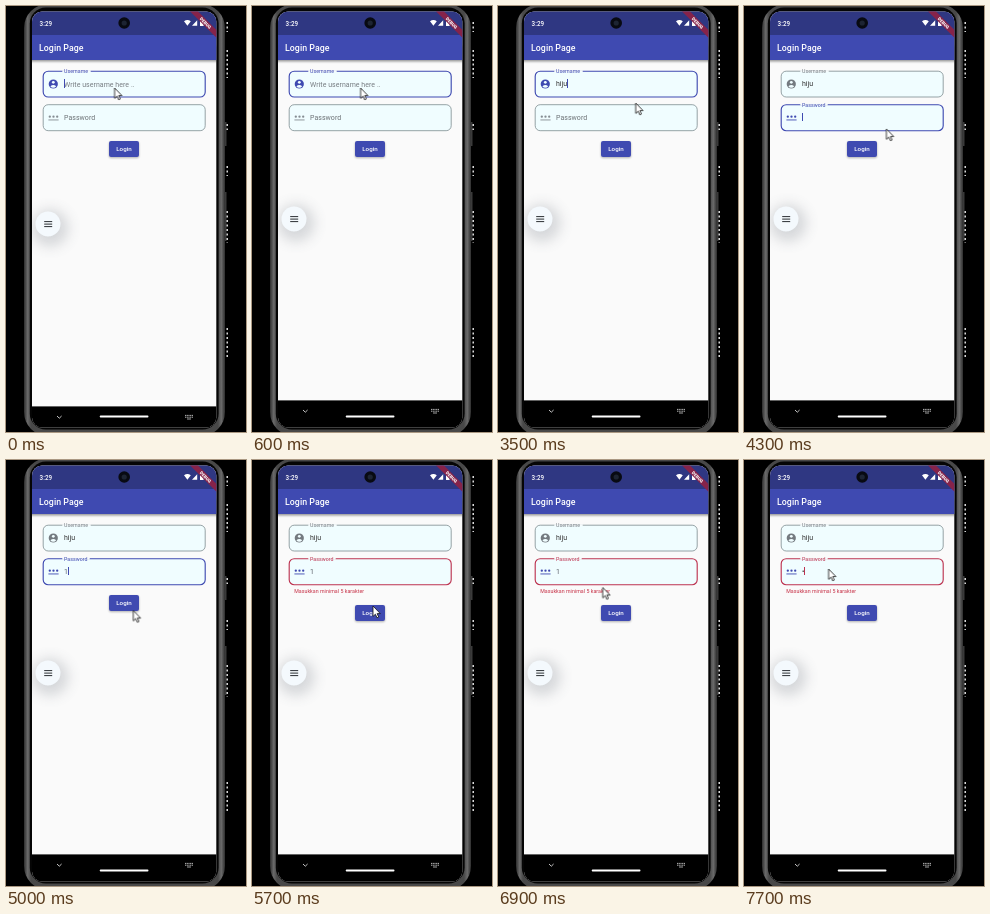
Recreate the animation shown at these times as an HTML page. Size 240 px wide and 426 px high, loop 8 s.

```html
<!DOCTYPE html>
<html lang="id">
<head>
<meta charset="utf-8">
<title>Login Page</title>
<style>
:root { --blue: #3f4ab1; --grey: #7d8c90; --red: #bd3350; --field: #f0fdff; }
html, body { margin: 0; width: 100%; height: 100%; overflow: hidden; background: #000; }
svg { position: absolute; left: 0; top: 0; display: block; }
text, .entry { font-family: Roboto, sans-serif; letter-spacing: .04px; }

/* every part shares one 8 s clock */
.ime, .fab, .hint, .user-box, .user-icon, .user-label, .pass-box, .pass-icon, .pass-label,
.gap, .error, .button, .ripple, .key, .caret, .pointer {
  animation: 8s linear infinite;
}

.ime { animation-name: ime; }
.fab { animation-name: fab; }
@keyframes ime { 0%, 1.25% { transform: none; animation-timing-function: ease-out; } 6.25%, 100% { transform: translateY(-6px); } }
@keyframes fab { 0%, 1.25% { transform: translateY(5px); animation-timing-function: ease-out; } 6.25%, 100% { transform: none; } }

.hint { animation-name: hint; animation-timing-function: step-end; }
@keyframes hint { 0% { opacity: 1; } 23.75%, 100% { opacity: 0; } }

/* focus leaves the first field at 4 s */
.field { fill: var(--field); }
.user-box { animation-name: user-box; }
.user-icon, .user-label { animation-name: blur; }
@keyframes user-box {
  0%, 50% { stroke: var(--blue); stroke-width: 1.15px; }
  52.5%, 100% { stroke: var(--grey); stroke-width: .8px; }
}
@keyframes blur { 0%, 50% { fill: var(--blue); } 52.5%, 100% { fill: #747a80; } }

/* the second field gains focus, then fails validation */
.pass-box { animation-name: pass-box; }
.pass-icon { animation-name: focus; }
.pass-label { animation-name: pass-label; }
.gap { animation-name: gap; }
@keyframes pass-box {
  0%, 50% { stroke: var(--grey); stroke-width: .8px; }
  52.5%, 68.5% { stroke: var(--blue); stroke-width: 1.15px; }
  70%, 100% { stroke: var(--red); stroke-width: 1.15px; }
}
@keyframes focus { 0%, 50% { fill: #858c92; } 52.5%, 100% { fill: var(--blue); } }
@keyframes pass-label {
  0%, 50% { transform: translate(58px, 113.7px); fill: #6c7276; animation-timing-function: ease-out; }
  52.5%, 68.5% { transform: translate(58px, 100.6px) scale(.75); fill: var(--blue); }
  70%, 100% { transform: translate(58px, 100.6px) scale(.75); fill: var(--red); }
}
@keyframes gap { 0%, 50% { opacity: 0; } 51.5%, 100% { opacity: 1; } }

.error { animation-name: error; }
.button { animation-name: drop; }
.ripple { animation-name: ripple; }
@keyframes error { 0%, 68.75% { opacity: 0; transform: translateY(-2px); } 71.25%, 100% { opacity: 1; transform: none; } }
@keyframes drop { 0%, 68.75% { transform: none; } 71.25%, 100% { transform: translateY(10px); } }
@keyframes ripple { 0%, 66.25% { opacity: 0; } 68.75% { opacity: .22; } 71.25%, 100% { opacity: 0; } }

/* untyped keys have no width, so the caret follows the text */
.entry { position: absolute; left: 58px; height: 10px; line-height: 10px; font-size: 7px; color: #333; white-space: nowrap; }
.key { font-size: 0; letter-spacing: 0; animation-timing-function: step-end; }
.k1 { animation-name: k1; } .k2 { animation-name: k2; } .k3 { animation-name: k3; } .k4 { animation-name: k4; }
.digit { animation-name: digit; color: #5b6068; } .bullet { animation-name: bullet; }
@keyframes k1 { 0% { font-size: 0; } 23.75%, 100% { font-size: 7px; } }
@keyframes k2 { 0% { font-size: 0; } 26.25%, 100% { font-size: 7px; } }
@keyframes k3 { 0% { font-size: 0; } 28.75%, 100% { font-size: 7px; } }
@keyframes k4 { 0% { font-size: 0; } 31.25%, 100% { font-size: 7px; } }
@keyframes digit { 0% { font-size: 0; } 60% { font-size: 7px; } 87.5%, 100% { font-size: 0; } }
@keyframes bullet { 0% { font-size: 0; } 87.5%, 100% { font-size: 7px; } }

.caret { display: inline-block; width: .9px; height: 8.6px; vertical-align: -1.7px; background: var(--blue); animation-timing-function: step-end; }
.user-caret { animation-name: user-caret; }
.pass-caret { animation-name: pass-caret; }
@keyframes user-caret {
  0% { opacity: 1; } 5% { opacity: 0; } 11.25% { opacity: 1; } 16.25% { opacity: 0; }
  23.75% { opacity: 1; } 36.25% { opacity: 0; } 41.25% { opacity: 1; } 46.25%, 100% { opacity: 0; }
}
@keyframes pass-caret {
  0% { opacity: 0; } 51.25% { opacity: 1; } 56.25% { opacity: 0; } 58.75% { opacity: 1; }
  67.5% { opacity: 0; background: var(--blue); } 75% { opacity: 1; background: var(--red); }
  81.25% { opacity: 0; } 87.5% { opacity: 1; } 92.5% { opacity: 0; } 95%, 100% { opacity: 1; background: var(--red); }
}

.pointer { animation-name: pointer; }
@keyframes pointer {
  0%, 40% { transform: translate(108.6px, 82px); }
  43.75% { transform: translate(137.6px, 97px); }
  46.25%, 47.5% { transform: translate(156px, 99px); }
  50%, 51.25% { transform: translate(150px, 109px); }
  58.75%, 62.5% { transform: translate(127.3px, 150.5px); }
  66.25%, 75% { transform: translate(121px, 146px); }
  78.75% { transform: translate(124.3px, 145px); }
  81.25%, 82.5% { transform: translate(125px, 146px); }
  90%, 100% { transform: translate(84.6px, 109px); }
}
</style>
</head>
<body>
<svg width="240" height="426" viewBox="0 0 240 426">
  <defs>
    <linearGradient id="metal">
      <stop offset="0" stop-color="#2e2e2e"/><stop offset=".018" stop-color="#6a6a6a"/>
      <stop offset=".035" stop-color="#484848"/><stop offset=".965" stop-color="#484848"/>
      <stop offset=".982" stop-color="#6a6a6a"/><stop offset="1" stop-color="#2e2e2e"/>
    </linearGradient>
    <clipPath id="screen"><rect x="26" y="5.5" width="184.3" height="416" rx="10"/></clipPath>
    <filter id="soft" x="-100%" y="-100%" width="300%" height="300%"><feGaussianBlur stdDeviation="7"/></filter>
    <filter id="near" x="-20%" y="-40%" width="140%" height="180%"><feGaussianBlur stdDeviation="1"/></filter>
  </defs>

  <!-- phone -->
  <path d="M219.5 116v24M219.5 186v49" stroke="#3a3a3a" stroke-width="2"/>
  <path d="M221.2 16v10M221.2 44v28M221.2 118v6M221.2 160v10M221.2 205v32M221.2 322v30" stroke="#fff" stroke-width="1.3" stroke-dasharray="2 2.5"/>
  <rect x="18" y="-2" width="201" height="432" rx="24" fill="url(#metal)"/>
  <rect x="23.8" y="1.5" width="188.8" height="422" rx="16" fill="#050505"/>

  <g clip-path="url(#screen)">
    <rect x="26" y="3" width="185" height="420" fill="#fafafa"/>

    <!-- app bar -->
    <rect x="24" y="40" width="190" height="15.5" fill="#000" opacity=".4" filter="url(#near)"/>
    <rect x="26" y="28" width="185" height="26" fill="#3f4ab1"/>
    <rect x="26" y="3" width="185" height="26" fill="#2f3782"/>
    <text x="33.6" y="19.8" font-size="6.3" font-weight="500" fill="#fff">3:29</text>
    <path d="M178 15.3q3.4-2.6 6.8 0l-3.4 4.4zM186 19.8l5.2-5.5v5.5z" fill="#fff"/>
    <path d="M194 14.7h1v-.8h1.6v.8h1v5.3H194z" fill="#fff"/>
    <text x="33" y="44.8" font-size="8.8" font-weight="500" fill="#fff">Login Page</text>
    <g transform="translate(199.6 17) rotate(45)">
      <rect x="-24" y="-2.8" width="48" height="5.6" fill="#86234a"/>
      <text y="1.6" font-size="4.4" font-weight="900" fill="#fff" text-anchor="middle">DEBUG</text>
    </g>

    <!-- username -->
    <rect class="field user-box" x="37.2" y="65.2" width="162" height="25.8" rx="5"/>
    <rect x="56.3" y="64.2" width="28.4" height="2" fill="#f5fbfc"/>
    <text class="user-label" x="58" y="67.2" font-size="5.25">Username</text>
    <g class="user-icon">
      <circle cx="47.3" cy="78" r="4.6"/>
      <circle cx="47.3" cy="76.3" r="1.4" fill="#f0fdff"/>
      <path d="M44.4 80.2q2.9-2.2 5.8 0q-1.1 1.6-2.9 1.6t-2.9-1.6" fill="#f0fdff"/>
    </g>
    <text class="hint" x="58" y="80.6" font-size="7" fill="#777d82">Write username here ..</text>

    <!-- password -->
    <rect class="field pass-box" x="37.2" y="98.7" width="162" height="26" rx="5"/>
    <rect class="gap" x="56.3" y="97.7" width="27.4" height="2" fill="#f5fbfc"/>
    <text class="pass-label" font-size="7">Password</text>
    <g class="pass-icon">
      <circle cx="43.8" cy="110.7" r="1.15"/><circle cx="47.5" cy="110.7" r="1.15"/><circle cx="51.2" cy="110.7" r="1.15"/>
      <rect x="42.4" y="113.5" width="10.2" height=".9"/>
    </g>
    <text class="error" x="42.2" y="133.2" font-size="5.25" fill="#c62f45">Masukkan minimal 5 karakter</text>

    <!-- login button -->
    <g class="button">
      <rect x="103" y="136" width="30" height="16" rx="2" fill="#000" opacity=".3" filter="url(#near)"/>
      <rect x="103" y="135" width="30" height="16" rx="2" fill="#3f4ab1"/>
      <rect class="ripple" x="103" y="135" width="30" height="16" rx="2" fill="#fff"/>
      <text x="118" y="145.2" font-size="6.2" font-weight="500" fill="#fff" text-anchor="middle">Login</text>
    </g>

    <!-- menu button -->
    <g class="fab">
      <circle cx="44" cy="217" r="18" fill="#5c6470" opacity=".24" filter="url(#soft)"/>
      <circle cx="42" cy="213" r="12.5" fill="#f4f9fd"/>
      <path d="M38.2 210.6h8M38.2 213.1h8M38.2 215.6h8" stroke="#2b2f33" stroke-width="1"/>
    </g>

    <!-- navigation bar -->
    <g class="ime">
      <rect x="26" y="400.4" width="185" height="40" fill="#000"/>
      <path d="M51 410l2.3 2.2 2.3-2.2" fill="none" stroke="#ddd" stroke-width=".9"/>
      <path d="M179 409.4h8M179 411.2h8" stroke="#ccc" stroke-width=".9" stroke-dasharray="1.2 .5"/>
      <path d="M181 413h4" stroke="#ccc" stroke-width=".8"/>
    </g>
    <rect x="93.7" y="409.6" width="48.8" height="1.9" rx=".95" fill="#fff"/>
  </g>
  <circle cx="118.2" cy="17" r="5.8" fill="#080a12"/>
  <circle cx="118.2" cy="17" r="2.6" fill="#1d2433"/>
</svg>

<div class="entry" style="top:73.4px"><span class="key k1">h</span><span class="key k2">i</span><span class="key k3">j</span><span class="key k4">u</span><span class="caret user-caret"></span></div>
<div class="entry" style="top:106.7px"><span class="key digit">1</span><span class="key bullet">•</span><span class="caret pass-caret"></span></div>

<svg width="240" height="426" viewBox="0 0 240 426">
  <path class="pointer" d="M0 0v10.4l2.4-2.2 1.6 3.6 1.7-.8-1.6-3.4h3.2z" fill="#fff" stroke="#111" stroke-width=".8" stroke-linejoin="round"/>
</svg>
</body>
</html>
```
